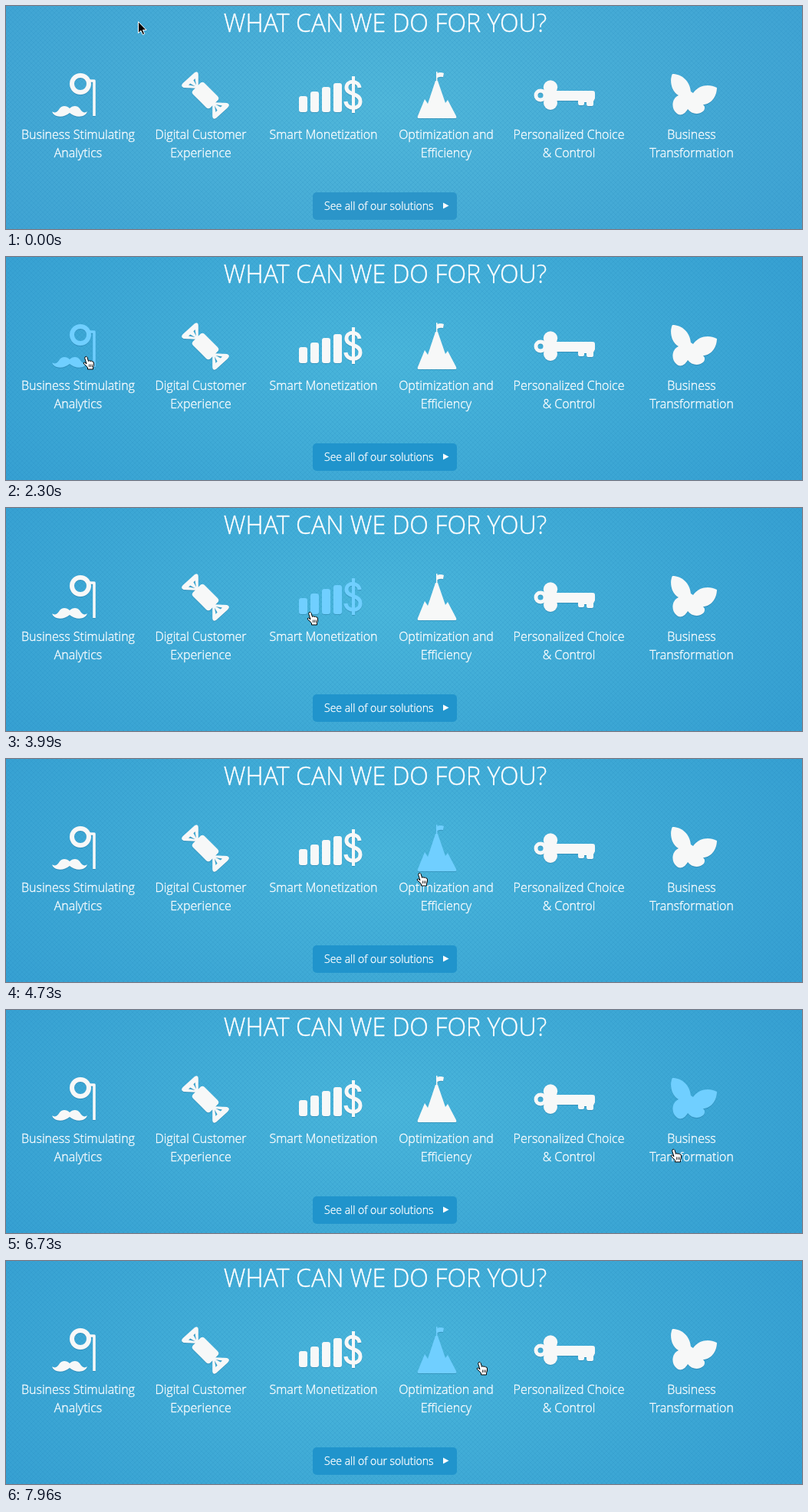
These frames come from a looping animation (1038 by 292 pixels, 8 s). An HTML page:

```html
<!DOCTYPE html>
<html lang="en">
<head>
<meta charset="utf-8">
<title>What can we do for you?</title>
<style>
  html, body { margin: 0; width: 100%; height: 100%; overflow: hidden; background: #3fa6d2; }
  svg { display: block; width: 1038px; height: 292px; --center: #50b7da; --edge: #3fa3d3; --button: #2b95c9; }
  svg.hovering { --center: #4ab6db; --edge: #36a0d2; --button: #2094cc; }
  text { font-family: "Open Sans", sans-serif; font-weight: 300; fill: #fff; stroke: #fff; stroke-width: .35px; }
  .label { font-size: 16px; text-anchor: middle; }
  .icon { color: #f7f8f8; fill: currentColor; filter: drop-shadow(0 1px 0.5px rgba(20, 80, 120, .25)); }
  .icon.on { color: #70cfff; }
  .line { fill: none; stroke: currentColor; }
</style>
</head>
<body>
<svg id="stage" viewBox="0 0 1038 292">
  <defs>
    <radialGradient id="glow" gradientUnits="userSpaceOnUse" cx="0" cy="0" r="1"
        gradientTransform="translate(495 130) scale(600 300)">
      <stop offset="0" stop-color="var(--center)"/>
      <stop offset="1" stop-color="var(--edge)"/>
    </radialGradient>
    <pattern id="weave" width="6" height="6" patternUnits="userSpaceOnUse">
      <path d="M0 0L6 6M6 0L0 6" stroke="#1678ae" stroke-opacity=".13"/>
    </pattern>
    <path id="wrapper" fill-rule="evenodd"
        d="M-15 -2L-26 -13Q-30 -16 -31 -11L-32 9Q-32 15 -27 13L-15 2ZM-18 -1L-25 -6V-3ZM-18 1L-25 6V3Z"/>
  </defs>

  <rect width="1038" height="292" fill="url(#glow)"/>
  <rect width="1038" height="292" fill="url(#weave)"/>
  <text x="494.5" y="34" font-size="32.2" text-anchor="middle">WHAT CAN WE DO FOR YOU?</text>

  <!-- monocle and moustache -->
  <g class="icon">
    <circle class="line" cx="97" cy="102" r="11" stroke-width="6"/>
    <path class="line" d="M108 98H115V144" stroke-width="3.6" stroke-linejoin="round"/>
    <path d="M83 134C79 130 73 130 70 134C67 139 64 141 60 138C62 146 75 147 83 140C91 147 104 146 106 138C102 141 99 139 96 134C93 130 87 130 83 134Z"/>
  </g>
  <!-- sweet -->
  <g class="icon">
    <g transform="translate(260 117) rotate(45)">
      <rect x="-16" y="-10.5" width="32" height="21" rx="4"/>
      <use href="#wrapper"/>
      <use href="#wrapper" transform="rotate(180)"/>
    </g>
  </g>
  <!-- bars and dollar -->
  <g class="icon">
    <rect x="382" y="118" width="11" height="21" rx="3"/>
    <rect x="397" y="112" width="11" height="27" rx="3"/>
    <rect x="412" y="106" width="11" height="33" rx="3"/>
    <rect x="427" y="101" width="11" height="38" rx="3"/>
    <path class="line" d="M461 107C460 97 445 97 444 106C443 117 462 113 462 125C462 136 444 136 443 125" stroke-width="5"/>
    <path class="line" d="M453 92V140" stroke-width="4"/>
  </g>
  <!-- mountain with flag -->
  <g class="icon">
    <path d="M538 147Q536 147 537 144L546 122L550 128L560 98H563L573 127L576 123L587 144Q588 147 586 147Z"/>
    <path d="M561 86H562.5V88Q566 86 571 88L570 93Q566 92 562.5 94V100H561Z"/>
  </g>
  <!-- key -->
  <g class="icon">
    <circle class="line" cx="697" cy="117" r="6" stroke-width="5"/>
    <circle cx="710" cy="106.5" r="9.2"/>
    <circle cx="710" cy="127" r="9"/>
    <path d="M703 111H765Q768 111 768 114V121Q767 123 766 125V129Q766 131 764 131H759Q757 131 757 128V126H754V128Q754 130 751 130H748Q746 130 746 127V124H703Z"/>
  </g>
  <!-- butterfly -->
  <g class="icon">
    <path d="M893 112C892 99 882 89 869 89C865 96 867 112 877 117C868 121 867 134 874 140C879 145 885 142 889 135C894 142 904 143 910 137C912 133 911 131 909 129C919 129 927 119 927 107C917 102 904 103 896 114Z"/>
  </g>

  <g id="labels"></g>
  <rect x="400" y="244" width="188" height="36" rx="5" fill="var(--button)"/>
  <text x="415" y="267" font-size="14">See all of our solutions</text>
  <path d="M570 257.5L577.5 261.500L570 265.500Z" fill="#fff"/>

  <g id="cursor">
    <path id="arrow" d="M.5 .5V15.500L4 12.300L6.300 17.500L8.700 16.500L6.500 11.400H11Z" fill="#000" stroke="#fff"/>
    <g id="hand" stroke="#000" stroke-linejoin="round" transform="translate(-.5 -.5)">
      <path d="M2.500 1.500Q4.500 -.3 5.500 2L7 7Q8.500 5 9.500 7Q11 5.500 12 7.500Q14 7 14 9.500Q14.500 13 13 15V17.500H6V15.500Q4 12.500 1 10.500Q0 8.500 2 8.500L4.500 10.500L2.200 3Z" fill="#fff"/>
      <path d="M8 11V14.500M10 11V14.500M12 11V14.500" stroke-width=".8"/>
    </g>
  </g>
</svg>
<script>
const LOOP = 8000;
const labels = [
  ["Business Stimulating", "Analytics"], ["Digital Customer", "Experience"],
  ["Smart Monetization"], ["Optimization and", "Efficiency"],
  ["Personalized Choice", "& Control"], ["Business", "Transformation"]
];
// Pointer stops: time, x, y
const stops = [
  [0, 172, 20], [680, 118, 40], [1340, 118, 40], [2090, 97, 99], [2300, 101, 130],
  [2550, 101, 130], [3290, 238, 120], [3540, 238, 120], [4100, 410, 138],
  [4340, 410, 138], [4730, 536, 149], [5180, 612, 169], [5640, 705, 173],
  [5950, 705, 173], [6430, 854, 182], [6620, 854, 182], [6730, 867, 182],
  [6900, 880, 182], [7150, 880, 182], [7380, 820, 222], [7550, 722, 164],
  [7740, 722, 164], [7960, 614, 132], [LOOP, 614, 132]
];
const byId = id => document.getElementById(id);
const [stage, cursor, arrow, hand] = ["stage", "cursor", "arrow", "hand"].map(byId);
const icons = document.querySelectorAll(".icon");

labels.forEach((lines, column) => lines.forEach((line, row) => {
  const text = document.createElementNS("http://www.w3.org/2000/svg", "text");
  text.setAttribute("class", "label");
  text.setAttribute("x", 94 + column * 160);
  text.setAttribute("y", 174 + row * 24);
  text.textContent = line;
  byId("labels").append(text);
}));

function pointerAt(time) {
  const next = stops.findIndex(stop => stop[0] > time);
  const [t0, x0, y0] = stops[next - 1], [t1, x1, y1] = stops[next];
  const p = (time - t0) / (t1 - t0), eased = p * p * (3 - 2 * p);
  return [x0 + (x1 - x0) * eased, y0 + (y1 - y0) * eased].map(Math.round);
}

function draw(now) {
  const [x, y] = pointerAt(now % LOOP);
  const active = y > 80 && y < 214 ? Math.floor((x - 9) / 160) : -1;
  const hovering = active >= 0;
  icons.forEach((icon, i) => icon.classList.toggle("on", i === active));
  stage.classList.toggle("hovering", hovering);
  arrow.style.display = hovering ? "none" : "";
  hand.style.display = hovering ? "" : "none";
  cursor.setAttribute("transform", `translate(${x} ${y})`);
  requestAnimationFrame(() => draw(performance.now()));
}
draw(performance.now());
</script>
</body>
</html>
```
